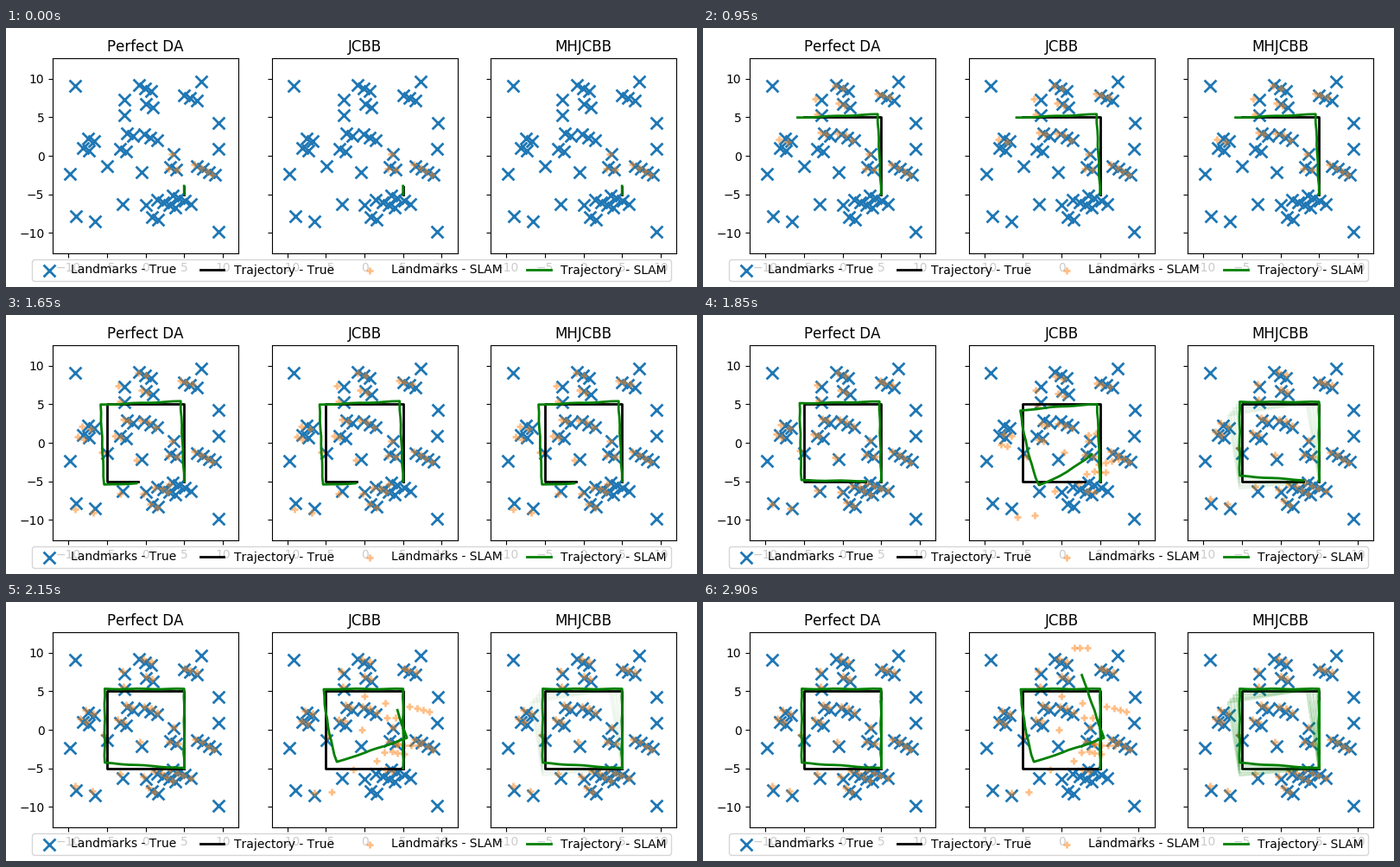
A matplotlib script that plays this animation: 800 by 300 pixels, repeating every 2950 ms.

```python
import numpy as np
import matplotlib.pyplot as plt
from matplotlib.animation import FuncAnimation

FRAMES, STEP_MS, LAST = 59, 50, 49
RANGE, HALF_FOV = 5.0, np.radians(60)
W, H = 800, 300
START = np.array([5, -5])
plt.rcParams['text.kerning_factor'] = 6
rng = np.random.default_rng(4)

# Lone landmarks, and slanted rows given by centre and count
lone = [(-9.15, 9.1), (7.25, 9.65), (-2.7, 7.3), (-2.7, 5.3), (9.5, 4.3), (9.4, .9),
        (3.65, .25), (-4.95, -1.3), (-.5, -2.1), (-9.8, -2.35), (-2.95, -6.25),
        (0, -6.4), (-9, -7.85), (-6.55, -8.5), (9.45, -9.85)]
rows = [(-.1, 8.8, 3), (5.8, 7.5, 3), (.5, 6.5, 2), (-7.1, 2.1, 2), (-7.7, .85, 2),
        (-2, 2.7, 2), (.65, 2.4, 3), (-2.9, .75, 2), (3.6, -1.6, 2), (7.8, -1.9, 4),
        (2.7, -6.2, 4), (4.7, -5.7, 4), (1.2, -8.1, 2)]
landmarks = np.array(lone + [(x + .8 * k, y - .35 * k) for x, y, n in rows
                             for k in np.arange(n) - (n - 1) / 2])

steps = np.arange(LAST + 1)
true_heading = np.pi / 2 * (1 + np.maximum(steps - 1, 0) // 10)


def walk(error=0, stride=1):
    """Dead reckoning round the square with a heading error in degrees."""
    a = true_heading + np.radians(error)
    move = np.column_stack([np.cos(a), np.sin(a)]) * np.reshape(stride, (-1, 1))
    move[0] = 0
    return START + move.cumsum(0)


def close_loop(path):
    """Spread the gap at the end of the first lap over its last side."""
    pull = np.clip((steps - 30) / 10, 0, 1)[:, None]
    return path - pull * (path[40] - START)


def wrap(a):
    return (a + np.pi) % (2 * np.pi) - np.pi


def rotate(v, a):
    c, s = np.cos(a), np.sin(a)
    return np.column_stack([c * v[:, 0] - s * v[:, 1], s * v[:, 0] + c * v[:, 1]])


truth = walk()
stride = np.where(steps <= 20, 1.03, .96)
drifted = walk(2.5, 1.04)
closed = close_loop(walk(0, stride))
lost = walk(np.minimum(2 + 38 * (steps / 38) ** 3, 40))
settled = walk(np.interp(steps, [18, 32], [0, 19]), stride)


def timeline(after, final):
    """Drift at first, a jump when old landmarks return, then settling."""
    return [(0, drifted), (33, drifted), (34, after), (37, after), (43, final)]


def blend(keys, n):
    for (a, p), (b, q) in zip(keys, keys[1:]):
        if n <= b:
            return p + (q - p) * (n - a) / (b - a)
    return keys[-1][1]


def first_seen(start):
    """First step from start at which each landmark is in view."""
    rel = landmarks[None] - truth[:, None]
    off = wrap(np.arctan2(rel[..., 1], rel[..., 0]) - true_heading[:, None])
    seen = (np.hypot(rel[..., 0], rel[..., 1]) < RANGE) & (abs(off) < HALF_FOV)
    seen[:start] = False
    return np.where(seen.any(0), seen.argmax(0), 999)


def mapped(path, seen, now):
    """Landmark estimates as placed from the estimated poses."""
    idx = np.flatnonzero(seen <= now)
    s = seen[idx]
    d = np.diff(path, axis=0, prepend=path[:1])
    turn = wrap(np.arctan2(d[:, 1], d[:, 0]) - true_heading)
    turn[0] = turn[1]
    view = rotate(landmarks[idx] - truth[s], np.clip(turn, -.3, .3)[s])
    return path[s] + view + noise[idx]


noise = rng.normal(0, .1, landmarks.shape)
wobble = .04 * np.column_stack([np.sin(1.9 * steps), np.sin(1.3 * steps)])
seen_once = first_seen(0)
seen_again = np.where(seen_once < 30, first_seen(35), 999)
ghost_turns = np.radians([2, 4.5, 7, 9])

fig = plt.figure(figsize=(W / 100, H / 100), dpi=100)
panels = []
for i, (title, keys) in enumerate([
        ('Perfect DA', timeline((drifted + closed) / 2, closed)),
        ('JCBB', timeline(lost, settled)),
        ('MHJCBB', timeline(closed, closed))]):
    ax = fig.add_axes([(54.1 + 253.5 * i) / W, 39 / H, 215 / W, 226 / H])
    ax.set(xlim=(-12.04, 12.04), ylim=(-12.67, 12.67), title=title,
           xticks=range(-10, 11, 5), yticks=range(-10, 11, 5))
    ax.tick_params(labelleft=i == 0)
    marks = ax.scatter(*landmarks.T, s=100, marker='x', color='C0', linewidths=2)
    found = ax.scatter([], [], s=36, marker='+', color='C1', linewidths=2, alpha=.5)
    true_line, = ax.plot([], [], 'k', lw=2)
    ghosts = [ax.plot([], [], 'g', lw=2)[0] for _ in ghost_turns] if i == 2 else []
    slam_line, = ax.plot([], [], 'g', lw=2)
    panels.append((title, keys, found, true_line, slam_line, ghosts))
    if i == 0:
        handles = [marks, true_line, found, slam_line]

fig.legend(handles, ['Landmarks - True', 'Trajectory - True',
                     'Landmarks - SLAM', 'Trajectory - SLAM'],
           loc='lower center', ncol=4)


def update(n):
    now = min(n + 1, LAST)
    for title, keys, found, true_line, slam_line, ghosts in panels:
        path = blend(keys, n)
        spots = mapped(path, seen_once, now)
        if title == 'JCBB':
            spots = np.vstack([spots, mapped(path, seen_again, now)])
        found.set_offsets(spots)
        true_line.set_data(*truth[:now + 1].T)
        slam_line.set_data(*(path + wobble)[:now + 1].T)
        alpha = np.interp(n, [33, 34, 43, 48], [0, .1, .06, .2])
        for ghost, turn in zip(ghosts, ghost_turns):
            ghost.set_data(*(START + rotate(path - START, turn))[:now + 1].T)
            ghost.set_alpha(alpha)


anim = FuncAnimation(fig, update, frames=FRAMES, interval=STEP_MS,
                     repeat=True, repeat_delay=0, blit=False)
plt.show()
```
